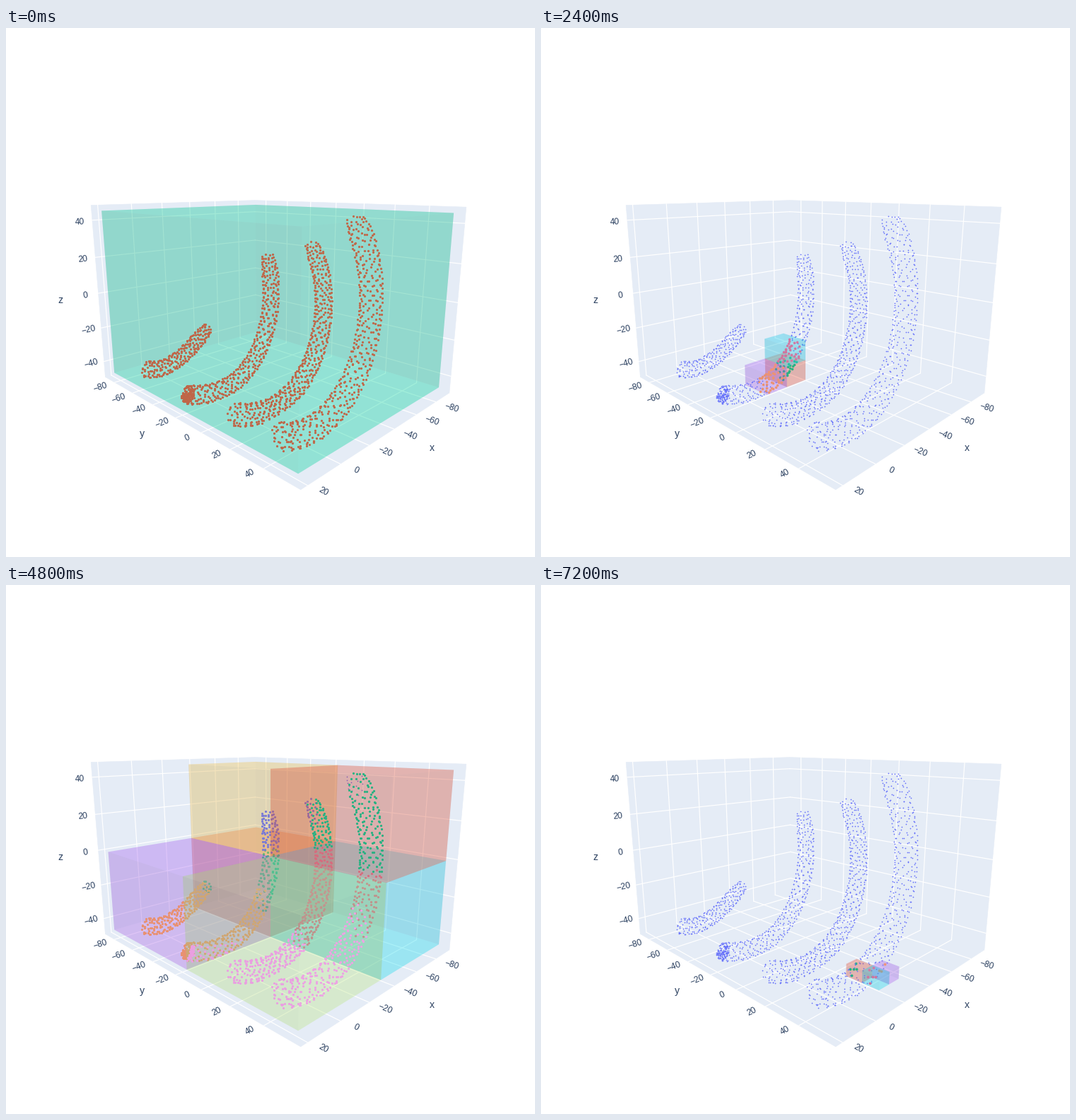
A matplotlib script that plays this animation: 748 by 748 pixels, repeating every 8000 ms.

```python
import numpy as np
import matplotlib.pyplot as plt
from matplotlib.animation import FuncAnimation
from matplotlib.patches import Polygon
from matplotlib.colors import to_rgb

SIZE, DPI = 748, 100
PT = 72 / DPI  # points per pixel

# Scene box in data units, and the camera looking at its centre
MID = np.array([-35.9, -16.0, -0.8])
HALF = np.array([56.1, 70.7, 45.8])
LO, HI = MID - HALF, MID + HALF
PAD = 1.0625
DIST, FOCAL, CX, CY = 257.8, 685.6, 374, 383.5
TILT = np.arctan(0.236)
S, C, R2 = np.sin(TILT), np.cos(TILT), np.sqrt(0.5)
EYE = np.array([C * R2, C * R2, S])
RIGHT = np.array([-R2, R2, 0])
UP = np.array([-S * R2, -S * R2, C])

BLUE, RED, GREEN, PURPLE, ORANGE = "#636EFA", "#EF553B", "#00CC96", "#AB63FA", "#FFA15A"
CYAN, PINK, LIME, MAGENTA, YELLOW = "#19D3F3", "#FF6692", "#B6E880", "#FF97FF", "#FECB52"
MESH = [RED, PURPLE, CYAN, LIME, YELLOW]
DOTS = [GREEN, ORANGE, PINK, MAGENTA, BLUE]
PANE, INK = "#E5ECF6", "#2a3f5f"


def project(pts):
    p = np.atleast_2d(pts) - MID
    depth = DIST - p @ EYE
    return np.column_stack([CX + FOCAL * (p @ RIGHT) / depth,
                            CY - FOCAL * (p @ UP) / depth])


def unproject(xy, y):
    """Points on the rays through the pixels that have the given y."""
    sx, sy = xy.T
    ray = -EYE + np.outer((sx - CX) / FOCAL, RIGHT) + np.outer((CY - sy) / FOCAL, UP)
    cam = MID + DIST * EYE
    return cam + ray * ((y - cam[1]) / ray[:, 1])[:, None]


def bezier(ctrl, t):
    p0, p1, p2, p3 = np.array(ctrl, float)
    t = t[:, None]
    u = 1 - t
    return u**3 * p0 + 3 * u * u * t * p1 + 3 * u * t * t * p2 + t**3 * p3


def tube(ctrl, y_span, radius, cap, rng):
    """Dots on a bent tube; its screen centre line is a Bezier curve."""
    t = np.linspace(0, 1, 400)
    y = MID[1] + HALF[1] * (2 * np.interp(t, [0, 1], y_span) - 1)
    path = unproject(bezier(ctrl, t), y)
    length = np.r_[0, np.cumsum(np.linalg.norm(np.diff(path, axis=0), axis=1))]
    end = length[-1]
    tan = np.gradient(path, axis=0)
    norm = np.column_stack([-tan[:, 2], 0 * t, tan[:, 0]])
    norm /= np.linalg.norm(norm, axis=1)[:, None]

    per, rings = 8, int(end / 2.3)
    ring, k = np.divmod(np.arange(per * rings), per)
    ang = (k + 0.5 * (ring % 2)) * 2 * np.pi / per + rng.normal(0, 0.08, len(k))
    dist = (ring + 0.5 + rng.uniform(-0.22, 0.22, len(k))) * end / rings
    rad = radius * (0.7 + 0.3 * np.minimum(1, (end - dist) / 9))
    # filled disc closing the lower end
    ang = np.r_[ang, rng.uniform(0, 2 * np.pi, cap)]
    rad = np.r_[rad, radius * np.sqrt(rng.uniform(0, 1, cap))]
    dist = np.r_[dist, rng.uniform(0, 0.8, cap)]

    def along(arr):
        return np.column_stack([np.interp(dist, length, col) for col in arr.T])
    pts = along(path) + along(norm) * (rad * np.sin(ang))[:, None]
    pts[:, 1] += rad * np.cos(ang)
    return np.clip(pts, LO + 0.05, HI - 0.05)


rng = np.random.default_rng(4)
CLOUD = np.vstack([
    tube([(197, 482), (235, 488), (262, 450), (286, 423)], (0.235, 0.09), 4.3, 10, rng),
    tube([(256, 518), (348, 527), (390, 420), (369, 320)], (0.49, 0.42), 4.4, 120, rng),
    tube([(324, 546), (425, 559), (479, 405), (431, 304)], (0.74, 0.50), 4.9, 10, rng),
    tube([(386, 577), (484, 586), (555, 400), (492, 267)], (0.935, 0.875), 5.3, 16, rng),
])
FLAT = project(CLOUD)

fig = plt.figure(figsize=(SIZE / DPI, SIZE / DPI), dpi=DPI, facecolor="white")
ax = fig.add_axes([0, 0, 1, 1])
ax.set_xlim(0, SIZE)
ax.set_ylim(SIZE, 0)
ax.axis("off")


def face(a, b, axis, top):
    """Corners of one face of the box a..b."""
    i, j = [k for k in range(3) if k != axis]
    quad = np.empty((4, 3))
    quad[:, axis] = (b if top else a)[axis]
    quad[:, i] = [a[i], b[i], b[i], a[i]]
    quad[:, j] = [a[j], a[j], b[j], b[j]]
    return project(quad)


def label(x, y, text, size=12, angle=0):
    ax.text(x, y, text, fontsize=size * PT, color=INK, family="Liberation Sans",
            rotation=angle, ha="center", va="center")


def draw_axes():
    a, b = MID - HALF * PAD, MID + HALF * PAD
    # per axis: last tick, edge carrying the labels, label offset, direction of the text
    rules = [(20, (0, b[1], a[2]), (22.5, 9), 1),
             (40, (b[0], 0, a[2]), (-20, 7.5), 0),
             (40, (b[0], a[1], 0), (-18, 3), 0)]
    for axis in range(3):
        ax.add_patch(Polygon(face(a, b, axis, False), fc=PANE, ec=PANE, lw=0.4, zorder=0))
    for axis, (last, edge, offset, side) in enumerate(rules):
        for val in range(-40 if axis == 2 else -80, last + 1, 20):
            for other in {0, 1, 2} - {axis}:
                ends = np.array([a, a])
                ends[:, axis] = val
                ends[1, other] = b[other]
                ax.plot(*project(ends).T, color="white", lw=1.2 * PT, zorder=1)
            ends = np.array([edge, edge], float)
            ends[:, axis] = val
            ends[1, side] = a[side]
            spot, far = project(ends)
            dx, dy = far - spot
            label(*(spot + offset), str(val).replace("-", "\u2212"),
                  angle=np.degrees(np.arctan(-dy / dx)))
    label(602, 594, "x", 14)
    label(192, 574, "y", 14)
    label(77, 385, "z", 14)


def child(a, b, k):
    bits = np.array([k & 1, k >> 1 & 1, k >> 2 & 1])
    half = (b - a) / 2
    return a + bits * half, a + (bits + 1) * half


# Two dives into the tree: octants entered, and the filled ones at each depth
DIVES = [("122", ["012346", "0123", "236", "01234567"]),
         ("323", ["012346", "01236", "134567", "567"])]
STEPS = []
for route, levels in DIVES:
    STEPS.append(("", None))
    STEPS += [(route[:depth], kids) for depth, kids in enumerate(levels)]
live = []


def add_faces(a, b, color, top, z):
    shades = (0.84, 0.92, 1.0 if top else 1.18)
    for axis in (2, 0, 1):
        rgb = np.clip(np.array(to_rgb(color)) * shades[axis], 0, 1)
        patch = Polygon(face(a, b, axis, top), fc=rgb, alpha=0.2, lw=0, zorder=z)
        live.append(ax.add_patch(patch))


def add_dots(mask, color, dia, z):
    live.append(ax.scatter(*FLAT[mask].T, s=(dia * PT) ** 2, c=color, lw=0, zorder=z))


def draw(i):
    while live:
        live.pop().remove()
    route, kids = STEPS[i]
    a, b = LO, HI
    for k in route:
        a, b = child(a, b, int(k))
    if kids is None:
        boxes = [(a, b, GREEN, RED)]
    else:
        boxes = [(*child(a, b, int(k)), MESH[n % 5], DOTS[n % 5])
                 for n, k in enumerate(kids)]
    boxes.sort(key=lambda box: ((box[0] - a) / (b - a)).sum())  # far to near

    front = (CLOUD > b).any(axis=1)
    add_dots(~front, BLUE, 1.7, 2)
    dia = 3.2 + 0.2 * len(route)
    for n, (p, q, mesh, dot) in enumerate(boxes):
        z = 3 + 3 * n
        inside = ((CLOUD >= p) & (CLOUD < q)).all(axis=1)
        add_faces(p, q, mesh, False, z)
        add_dots(inside, dot, dia, z + 1)
        add_faces(p, q, mesh, True, z + 2)
    add_dots(front, BLUE, 1.7, 40)
    return live


draw_axes()
anim = FuncAnimation(fig, draw, frames=len(STEPS), init_func=lambda: [],
                     interval=800, repeat=True, repeat_delay=0, blit=False)
plt.show()
```
